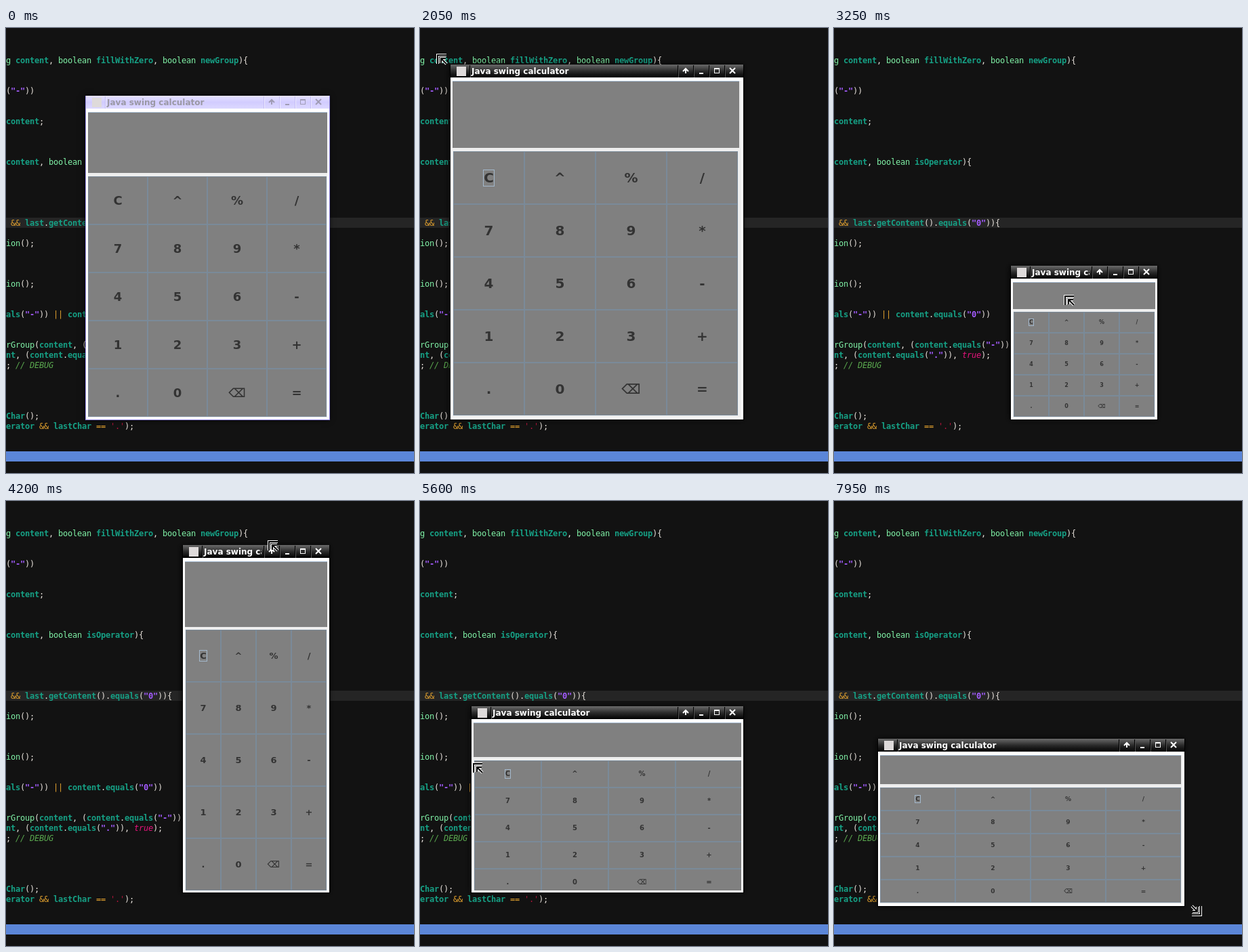
Write an HTML page with a canvas that moves like this. It is 602 px wide and 657 px high and loops after 8000 ms.

```html
<!DOCTYPE html>
<html lang="en">
<head>
<meta charset="utf-8">
<title>Resizing a calculator</title>
<style>
html, body { margin: 0; width: 100%; height: 100%; overflow: hidden; background: #121212; }
canvas { display: block; }
</style>
</head>
<body>
<canvas id="stage" width="602" height="657"></canvas>
<script>
const ctx = document.getElementById('stage').getContext('2d');
const LOOP = 8000;
const MONO = '12px "DejaVu Sans Mono", monospace';
const SANS = '"DejaVu Sans", sans-serif';

// [text centre y, text]
const CODE = [
  [48, 'g content, boolean fillWithZero, boolean newGroup){'],
  [93, '("-"))'],
  [138, 'content;'],
  [198, 'content, boolean isOperator){'],
  [288, ' && last.getContent().equals("0")){'],
  [318, 'ion();'],
  [378, 'ion();'],
  [423, 'als("-")) || content.equals("0"))'],
  [468, 'rGroup(content, (content.equals("-"))'],
  [483, 'nt, (content.equals(".")), true);'],
  [498, '; // DEBUG'],
  [573, 'Char();'],
  [588, "erator && lastChar == '.');"]
];

// [pattern, colour, font style]; the first match wins
const STYLES = [
  [/^\/\//, '#5aa84f', 'italic '],
  [/^"/, '#a45cff', 'bold '],
  [/^'/, '#b8143c', ''],
  [/^(&&|\|\||==)/, '#e5a32e', ''],
  [/^true$/, '#e6147d', 'italic '],
  [/^(boolean|g|ion|rGroup)$/, '#80f2a7', ''],
  [/^\w/, '#16a085', 'bold '],
  [/./, '#e8e2dc', '']
];
const TOKEN = /\/\/.*|"[^"]*"|'[^']*'|&&|\|\||==|\w+|[^\w\s]/g;

const KEYS = 'C^%/789*456-123+.0⌫='.split('');

// Key points of the pointer: time, x, y
const PATH = [
  [500, 215, 8], [1300, 115, 95], [1550, 115, 95],
  [2050, 24, 38], [2450, 52, 45], [2600, 70, 66],
  [2850, 130, 150], [3100, 290, 345], [3250, 339, 394],
  [4080, 389, 60], [4200, 386, 58], [4750, 205, 160],
  [5300, 30, 185], [5500, 73, 298], [5600, 77, 386],
  [5950, 62, 624], [6150, 62, 624], [6300, 362, 597],
  [6600, 454, 575], [6950, 466, 568], [7500, 466, 568],
  [7850, 506, 588], [7950, 526, 596], [LOOP, 526, 596]
];
const STEP = 160;        // rough time between redraws
const FRAME_LAG = 100;   // the window trails the pointer
const LAYOUT_LAG = 16;   // its contents trail the window
const NW_DRAG = [1550, 6150];
const SE_DRAG = 6950;

const clamp = (v, lo, hi) => Math.min(hi, Math.max(lo, v));

function segment(t) {
  const i = clamp(PATH.findIndex(k => k[0] > t), 1, PATH.length - 1);
  return [PATH[i - 1], PATH[i]];
}

function pointerAt(t) {
  const [[t0, x0, y0], [t1, x1, y1]] = segment(t);
  const p = clamp((t - t0) / (t1 - t0), 0, 1);
  return [x0 + (x1 - x0) * p, y0 + (y1 - y0) * p].map(Math.round);
}

// Holds each segment in equal steps
function snap(t) {
  const [[t0], [t1]] = segment(t);
  const step = (t1 - t0) / Math.max(1, Math.round((t1 - t0) / STEP));
  return t0 + Math.floor((t - t0) / step) * step;
}

function windowAt(t) {
  const [nx, ny] = pointerAt(clamp(t, ...NW_DRAG));
  const [sx, sy] = pointerAt(Math.max(t, SE_DRAG));
  return {x: Math.min(nx + 3, 261), y: Math.min(ny + 5, 351), r: sx + 11, b: sy + 10};
}

function cursorAt(t) {
  if (t < 500) return '';
  if (t < 1300) return 'arrow';
  if (t < 6300) return 'nw';
  return t < 7350 ? 'arrow' : 'se';
}

function rect(colour, x, y, w, h) {
  ctx.fillStyle = colour;
  ctx.fillRect(x, y, w, h);
}

function outline(colour, x, y, w, h) {
  ctx.strokeStyle = colour;
  ctx.lineWidth = 1;
  ctx.strokeRect(x + .5, y + .5, w - 1, h - 1);
}

function clipTo(x, y, w, h) {
  ctx.beginPath();
  ctx.rect(x, y, w, h);
  ctx.clip();
}

function drawEditor() {
  rect('#121212', 0, 0, 602, 657);
  rect('#252525', 0, 280, 602, 15);
  rect('#5b86d8', 0, 625, 602, 15);
  ctx.textAlign = 'left';
  ctx.font = MONO;
  ctx.letterSpacing = 7 - ctx.measureText('m').width + 'px';
  for (const [y, line] of CODE) {
    for (const m of line.matchAll(TOKEN)) {
      const [, colour, style] = STYLES.find(s => s[0].test(m[0]));
      ctx.font = style + MONO;
      ctx.fillStyle = colour;
      ctx.fillText(m[0], m.index * 7, y + 4);
    }
  }
  ctx.letterSpacing = '0px';
}

function drawTitleBar({x, y, r}, active) {
  const ink = active ? '#fff' : '#a09cb4';
  const fill = ctx.createLinearGradient(0, y, 0, y + 19);
  const stops = active ? ['#6a6a6a', '#2c2c2c', '#000'] : ['#e6e2ff', '#d2ccff', '#dcd8ff'];
  stops.forEach((c, i) => fill.addColorStop(i / 2, c));
  rect(fill, x, y, r - x, 19);
  for (const sx of [x + 28, r - 97, r - 74, r - 51, r - 28]) {
    rect(active ? '#000' : '#c4bdf4', sx, y + 1, 1, 18);
    rect(active ? '#555' : '#ece9ff', sx + 1, y + 1, 1, 18);
  }
  rect('#dedada', x + 9, y + 3, 14, 14);

  ctx.save();
  clipTo(x, y, r - 100 - x, 19);
  ctx.font = 'bold 12px ' + SANS;
  ctx.textAlign = 'left';
  ctx.fillStyle = active ? '#fff' : '#9a98a4';
  ctx.fillText('Java swing calculator', x + 31, y + 14);
  ctx.restore();

  const cy = y + 9;
  ctx.strokeStyle = ink;
  ctx.lineWidth = 2;
  ctx.beginPath();
  ctx.moveTo(r - 85, cy + 4);
  ctx.lineTo(r - 85, cy - 3);
  ctx.moveTo(r - 89, cy + 1);
  ctx.lineTo(r - 85, cy - 3);
  ctx.lineTo(r - 81, cy + 1);
  ctx.moveTo(r - 20, cy - 4);
  ctx.lineTo(r - 12, cy + 4);
  ctx.moveTo(r - 12, cy - 4);
  ctx.lineTo(r - 20, cy + 4);
  ctx.stroke();
  rect(ink, r - 65, cy + 3, 6, 2);
  outline(ink, r - 43, cy - 4, 8, 8);
  rect(ink, r - 43, cy - 4, 8, 2);
}

function drawKeys(x, y, w, h, active, hover) {
  const cw = Math.floor(w / 4), ch = Math.floor(h / 5);
  const left = x + Math.floor((w - 4 * cw) / 2);
  const top = y + Math.floor((h - 5 * ch) / 2);
  const size = Math.ceil(Math.min(cw, ch) / 4);
  ctx.font = `bold ${size}px ${SANS}`;
  ctx.textAlign = 'center';
  KEYS.forEach((key, i) => {
    const kx = left + i % 4 * cw, ky = top + Math.floor(i / 4) * ch;
    const mx = kx + cw / 2, my = ky + ch / 2;
    rect('#808080', kx, ky, cw, ch);
    outline('#7a8a99', kx, ky, cw, ch);
    if (key === hover) outline('#9fb4c8', kx + 1, ky + 1, cw - 2, ch - 2);
    ctx.fillStyle = '#333';
    ctx.fillText(key, mx, Math.round(my + size * .346));
    if (key === 'C' && active) {
      const fw = Math.round(size * .734) + 2, fh = Math.round(size * 1.164) + 2;
      outline('#a3b8cc', Math.round(mx - fw / 2), Math.round(my - fh / 2), fw, fh);
    }
  });
}

function drawWindow(t) {
  const box = windowAt(t - FRAME_LAG);
  const late = windowAt(t - FRAME_LAG - LAYOUT_LAG);
  const {x, y, r, b} = box;
  const active = t >= NW_DRAG[0];
  const hover = t >= SE_DRAG && t < 7700 ? '=' : '';

  ctx.save();
  ctx.shadowColor = 'rgba(0,0,0,.7)';
  ctx.shadowBlur = 8;
  ctx.shadowOffsetX = -1;
  rect(active ? '#000' : '#8f84e0', x - 1, y, r - x + 2, b - y + 1);
  ctx.restore();

  rect('#fff', x, y, r - x, b - y);
  drawTitleBar(box, active);

  const left = x + 3, top = y + 24;
  const w = late.r - late.x - 6, h = late.b - late.y - 27;
  const screenH = Math.floor(h / 5);
  ctx.save();
  clipTo(left, top, r - 3 - left, b - 3 - top);
  rect('#eee', left, top, r - left, b - top);
  rect('#808080', left, top, w, screenH);
  rect('#a9bfd6', left, top, w, 1);
  drawKeys(left, top + screenH + 4, w, h - screenH - 4, active, hover);
  ctx.restore();
}

function strokeLines(lines, colour, width) {
  ctx.strokeStyle = colour;
  ctx.lineWidth = width;
  ctx.beginPath();
  for (const line of lines) {
    line.forEach(([x, y], i) => i ? ctx.lineTo(x, y) : ctx.moveTo(x, y));
  }
  ctx.stroke();
}

function drawCursor(kind, x, y) {
  if (!kind) return;
  ctx.save();
  ctx.translate(x, y);
  if (kind === 'arrow') {
    const shape = [[1, 1], [1, 15], [4, 12], [7, 17], [9, 16], [7, 11], [11, 11], [1, 1]];
    strokeLines([shape], '#fff', 2);
    ctx.fillStyle = '#000';
    ctx.fill();
  } else {
    if (kind === 'se') {
      ctx.translate(17, 17);
      ctx.rotate(Math.PI);
    }
    const corner = (d, end) => [[d, end], [d, d], [end, d]];
    const lines = [corner(2, 15), corner(7, 14), [[7, 7], [15, 15]]];
    strokeLines(lines, '#fff', 4);
    strokeLines(lines, '#000', 2);
  }
  ctx.restore();
}

function frame(now) {
  const t = snap(now % LOOP);
  drawEditor();
  drawWindow(t);
  drawCursor(cursorAt(t), ...pointerAt(t));
  requestAnimationFrame(frame);
}
requestAnimationFrame(frame);
</script>
</body>
</html>
```
